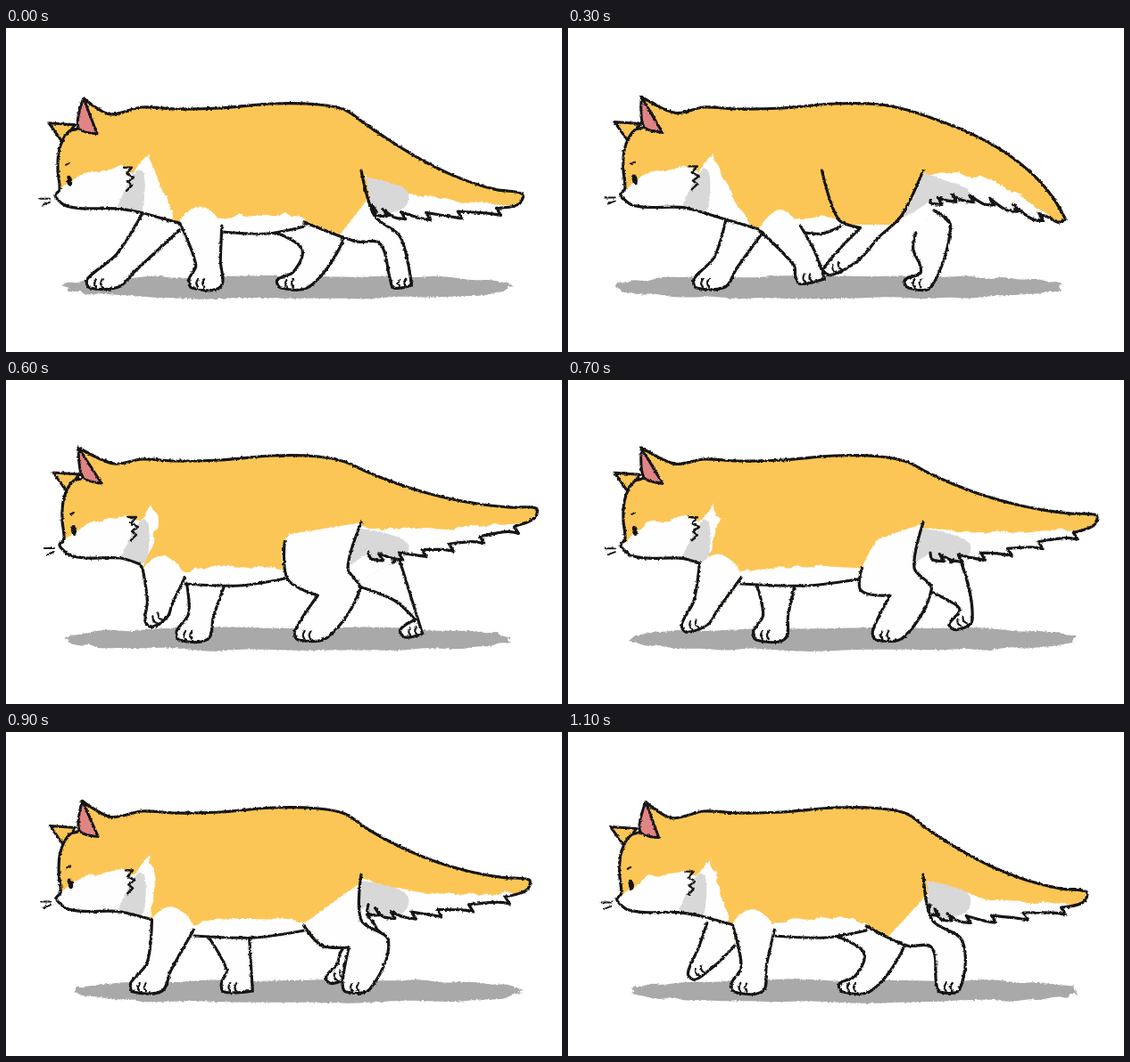
An HTML page with a canvas for the animation above (1200 ms loop, 623x364 px).

```html
<!DOCTYPE html>
<html lang="en">
<head>
<meta charset="utf-8">
<title>Walking cat</title>
<style>
html, body { margin: 0; width: 100%; height: 100%; overflow: hidden; background: #fff; }
canvas { display: block; filter: url(#crayon); }
svg { position: absolute; width: 0; height: 0; }
</style>
</head>
<body>
<canvas id="stage" width="623" height="364"></canvas>
<svg><filter id="crayon" x="0" y="0" width="100%" height="100%" color-interpolation-filters="sRGB">
  <feTurbulence id="grain" type="fractalNoise" baseFrequency=".35" numOctaves="2" result="noise"/>
  <feDisplacementMap in="SourceGraphic" in2="noise" scale="3" xChannelSelector="R" yChannelSelector="G"/>
</filter></svg>
<script>
const ctx = document.getElementById('stage').getContext('2d');
const grain = document.getElementById('grain');
const INK = '#151515', FUR = '#fcc656', WHITE = '#fefefe', GREY = '#d8d8d9', SHADE = '#a9a9a9', PINK = '#e18484';
const STEPS = 12, STEP_MS = 100, GROUND = 292;

// The head is rigid: it only sways
const HEAD = [[122,203], [85,203], [66,200], [57,193], [54,188], [59,182], [57,160], [58,140], [63,125], [70,116]];
const FAR_EAR = [[62,128], [47,107], [76,109]];
const CHEEK = [[123,203], [132,182], [146,160], [153,163], [154,190], [148,209]];
const MASK = [[57,184], [85,164], [130,156], [142,163], [158,142], [165,160]];
const TUFT = [[131,157], [140,157], [134,164], [142,168], [135,173], [140,177], [134,183]];
const WHISKERS = [[[37,192], [48,192]], [[40,199], [48,196]]];
const BACK = [[152,89], [190,91], [240,90], [300,85], [350,86]];

// Tail angles in degrees at root, middle and tip, one entry per two steps
const TAIL = [[35,28,5], [30,45,68], [5,18,62], [26,14,0], [32,18,3], [40,22,2]];

const clamp = v => Math.max(0, Math.min(1, v));
const mix = (a, b, k) => a + (b - a) * k;
const smooth = p => p * p * (3 - 2 * p);
const easeIn = p => p * p;
const easeOut = p => 1 - (1 - p) ** 3;

// touch: landing step, x: landing place, speed: drift per step on the ground
const GAIT = {
  nearFore: { touch: 8, x: 121, speed: 21.8, stance: 6.5, swing: 5.5, lift: 16, ease: smooth },
  farFore: { touch: 0, x: 94, speed: 16.7, stance: 9.3, swing: 2.7, lift: 15, ease: smooth },
  nearHind: { touch: 4, x: 292, speed: 17.8, stance: 8, swing: 4, lift: 20, ease: easeOut },
  farHind: { touch: 0, x: 308, speed: 24.5, stance: 5.7, swing: 4.3, lift: 14, ease: easeIn }
};

let seed = 1;
const jitter = size => {
  seed = seed * 16807 % 2147483647;
  return (seed / 2147483647 - .5) * size;
};

// Smooth curve through the points that keeps sharp turns as corners
function curve(pts, closed) {
  const n = pts.length, path = new Path2D();
  const at = i => closed ? pts[(i + n) % n] : pts[Math.max(0, Math.min(n - 1, i))];
  const tangent = i => {
    const [a, p, b] = [at(i - 1), at(i), at(i + 1)];
    if ((p[0] - a[0]) * (b[0] - p[0]) + (p[1] - a[1]) * (b[1] - p[1]) <= 0) return [0, 0];
    const len = Math.hypot(b[0] - a[0], b[1] - a[1]);
    return [(b[0] - a[0]) / len, (b[1] - a[1]) / len];
  };
  path.moveTo(...pts[0]);
  for (let i = 0; i < (closed ? n : n - 1); i++) {
    const p = at(i), q = at(i + 1), s = tangent(i), e = tangent(i + 1);
    const h = Math.hypot(q[0] - p[0], q[1] - p[1]) * .3;
    path.bezierCurveTo(p[0] + s[0] * h, p[1] + s[1] * h, q[0] - e[0] * h, q[1] - e[1] * h, ...q);
  }
  if (closed) path.closePath();
  return path;
}

function fill(pts, color) {
  ctx.fillStyle = color;
  ctx.fill(curve(pts, true));
}

function ink(pts, width = 3.2, closed = false) {
  ctx.lineWidth = width;
  ctx.stroke(curve(pts, closed));
}

function clipped(pts, draw) {
  ctx.save();
  ctx.clip(curve(pts, true));
  draw();
  ctx.restore();
}

// White brushed over everything below a ragged edge
function whiten(edge) {
  const rough = [];
  edge.slice(1).forEach((q, i) => {
    const p = edge[i], n = Math.ceil(Math.hypot(q[0] - p[0], q[1] - p[1]) / 9);
    for (let k = 0; k < n; k++)
      rough.push([mix(p[0], q[0], k / n) + jitter(4), mix(p[1], q[1], k / n) + jitter(4)]);
  });
  const [x, y] = edge[0], end = edge[edge.length - 1];
  fill([[x - 15, y], ...rough, end, [end[0], 330], [x - 15, 330]], WHITE);
}

// Foot on the ground or swinging forward; at() gives points relative to the toe
function footOf({ touch, x, speed, stance, swing, lift, ease }, step) {
  const u = (step - touch + STEPS) % STEPS, p = clamp((u - stance) / swing);
  const up = Math.sin(Math.PI * p), c = Math.cos(.6 * up), s = Math.sin(.6 * up);
  const toe = [x + speed * (p ? stance * (1 - ease(p)) : u), GROUND - lift * up];
  return { x: toe[0], up, start: x, at: (dx, dy) => [toe[0] + dx * c + dy * s, toe[1] - dx * s + dy * c] };
}

function foreLeg(foot) {
  const travel = foot.x - foot.start;
  const front = [153 + travel * .48 - 22 * foot.up, 208 + travel * .13];
  const back = [front[0] + 47, 222];
  const paw = foot.at(22 - 10 * foot.up, -8), hip = [front[0] + 23, 217];
  const dx = hip[0] - paw[0], dy = hip[1] - paw[1], len = Math.hypot(dx, dy);
  const ankle = side => [paw[0] + dx * .3 - dy / len * side, paw[1] + dy * .3 + dx / len * side];
  return [front, ankle(-14), foot.at(-3, -10), foot.at(0, 0), foot.at(32 - 12 * foot.up, -1), ankle(14), back];
}

function nearHindLeg(foot) {
  const s = foot.x - 310, k = clamp((s - 5) / 35);
  return [[398, 160], [378 + s * .28, 211], [Math.min(442, 386 + s * .6) - 40 * foot.up, 235],
    foot.at(35 - s * .12, -3), foot.at(0, 0), foot.at(-4, -10),
    [338 + s * .65, 242 - 25 * foot.up], [303 + Math.max(0, s) * .72, 215 + 25 * k],
    [mix(300, 334, k) - 22 * foot.up, mix(160, 218, k)]];
}

function farHindLeg(foot) {
  const s = foot.x - 310;
  return [[305 + Math.min(85, s * 1.5), 230], [333 + s * .75, 248], foot.at(14, -18), foot.at(-4, -9),
    foot.at(0, 0), foot.at(31 - s * .08, -1), [375 + Math.min(65, s * .75), 247 - s * .35], [385 + s * .35, 205]];
}

// Upper part in one colour, white below the line through (x, y)
function paintLeg(foot, pts, color, [x, y, slope], rise) {
  const a = pts[0], b = pts[pts.length - 1];
  const shape = [...pts, [(a[0] + b[0]) / 2, Math.min((a[1] + b[1]) / 2 - rise, a[1])]];
  fill(shape, color);
  clipped(shape, () => fill([[x - 400, y - 400 * slope], [x + 400, y + 400 * slope], [x + 400, 900], [x - 400, 900]], WHITE));
  ink(pts);
  for (const d of [7, 14]) ink([foot.at(d, -1), foot.at(d - 2, -5), foot.at(d, -10)], 2.2);
}

function tailOf(step) {
  const i = step >> 1, a = TAIL[i], b = TAIL[(i + 1) % TAIL.length];
  const [root, mid, tip] = a.map((v, j) => mix(v, b[j], step % 2 / 2) * Math.PI / 180);
  const bend = s => root * (1 - s) * (1 - 2 * s) + 4 * mid * s * (1 - s) + tip * s * (2 * s - 1);
  const n = 8, top = [[380, 92]];
  for (let j = 0; j < n; j++) {
    const [x, y] = top[j], angle = bend((j + .5) / n);
    top.push([x + 222 / n * Math.cos(angle), y + 222 / n * Math.sin(angle)]);
  }
  const off = ([x, y], angle, along, out) =>
    [x + along * Math.cos(angle) - out * Math.sin(angle), y + along * Math.sin(angle) + out * Math.cos(angle)];
  const end = off(top[n], tip, -8, 15);
  const centre = out => off(top[n / 2], bend(.5), 8, out);
  top.push(off(top[n], tip, 0, 9));

  // Tufts along the underside, each pointing to the tip
  const under = bow(end, centre(58), [406, 194]), edge = [end];
  for (let j = 0; j < 6; j++) {
    const [x, y] = under((j + .4) / 6);
    edge.push([x, y], [x + 5, y + 8], [x - 8, y + 6]);
  }
  edge.push(under(1));
  const fringe = bow([400, 166], centre(36), end);
  return { outline: [...top, ...edge], fringe: [0, .25, .5, .75, 1].map(fringe) };
}

// Quadratic curve from a to b that passes m half way
function bow(a, m, b) {
  return t => a.map((v, i) => (1 - t) ** 2 * v + 2 * t * (1 - t) * (2 * m[i] - (v + b[i]) / 2) + t * t * b[i]);
}

function drawShadow(turn) {
  const soft = v => Math.sign(v) * Math.abs(v) ** .75, pts = [];
  for (let a = 0; a < 6.28; a += .13)
    pts.push([316 - 11 * Math.sin(turn) + 250 * soft(Math.cos(a)) + jitter(10), 291 + 12.5 * soft(Math.sin(a)) + jitter(3)]);
  fill(pts, SHADE);
}

function draw(step) {
  seed = 77 + step * 1009;
  const turn = step / STEPS * 2 * Math.PI;
  const sway = Math.cos(turn + .5), dx = 3.5 - 2.8 * sway, dy = 1.4 * Math.cos(turn) - 1.6;
  const onHead = pts => pts.map(([x, y]) => [x + dx, y + dy]);
  const [earBase, earTip, earInner, earOuter] = onHead([[80,112], [80.5 + 6 * sway, 79], [101,119], [115,97]]);

  const feet = {};
  for (const name in GAIT) feet[name] = footOf(GAIT[name], step);
  const { nearFore, farFore, nearHind, farHind } = feet;
  const fore = foreLeg(nearFore), hind = nearHindLeg(nearHind), tail = tailOf(step);
  const chest = fore[0], elbow = fore[fore.length - 1], flank = Math.max(305, hind[hind.length - 1][0]);
  const belly = [[flank, 223], [mix(flank, elbow[0], .45), 231], [elbow[0], 229]];
  const outline = [chest, [mix(chest[0], 150, .6), mix(chest[1], 207, .6)], [150, 207],
    ...onHead(HEAD), earBase, earTip, earOuter, ...BACK, ...tail.outline];
  const torso = [...outline, [372, 214], ...belly];

  ctx.fillStyle = '#fff';
  ctx.fillRect(0, 0, 623, 364);
  ctx.strokeStyle = INK;
  ctx.lineCap = ctx.lineJoin = 'round';
  drawShadow(turn);

  const furEnd = foot => [foot.x, 254 - 6 * foot.up, .05];
  paintLeg(farFore, foreLeg(farFore), FUR, furEnd(farFore), 0);
  paintLeg(farHind, farHindLeg(farHind), GREY, [farHind.x, 190 + (farHind.x - 310) * .5, -.2], 0);
  fill(onHead(FAR_EAR), FUR);
  ink(onHead(FAR_EAR), 3, true);

  fill(torso, FUR);
  clipped(torso, () => {
    whiten([...onHead(MASK), [mix(168, chest[0], .4), 190], [chest[0] - 4, chest[1] + 4]]);
    whiten([[elbow[0], 216], [elbow[0] + 18, 211], [flank - 20, 209], [flank + 8, 217]]);
    whiten(tail.fringe);
    fill(onHead(CHEEK), GREY);
    fill([[390,166], [425,172], [450,184], [446,202], [410,212], hind[1]], GREY);
  });
  ink(outline);
  ink(belly);
  paintLeg(nearHind, hind, FUR, [350 + (nearHind.x - 310) * .38, 221, -Math.max(0, nearHind.x - 305) / 100], 20);
  paintLeg(nearFore, fore, FUR, furEnd(nearFore), 20);

  fill([earBase, earTip, earInner], PINK);
  ink([earBase, earTip, earInner], 3, true);
  ink(onHead(TUFT), 2.4);
  ink(onHead([[66,154], [70,152]]), 2);
  WHISKERS.forEach(w => ink(onHead(w), 2));
  ctx.fillStyle = INK;
  ctx.beginPath();
  ctx.ellipse(70 + dx, 172 + dy, 3, 6, -.15, 0, 7);
  ctx.fill();
}

let shown = -1;
function tick() {
  const step = Math.floor(performance.now() / STEP_MS) % STEPS;
  if (step !== shown) {
    shown = step;
    grain.setAttribute('seed', step);
    draw(step);
  }
  requestAnimationFrame(tick);
}
tick();
</script>
</body>
</html>
```
